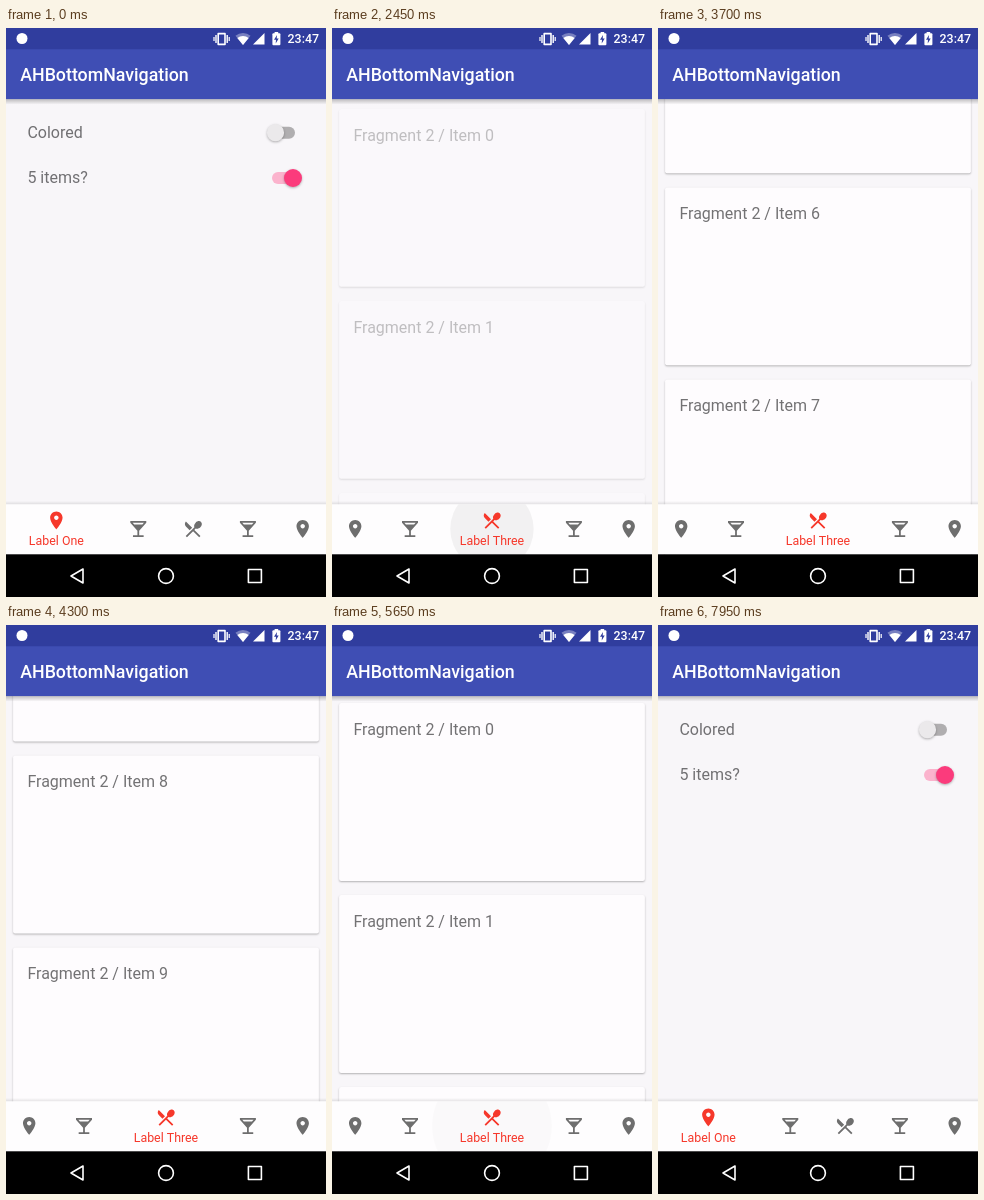
An HTML page with a canvas for the animation above (8000 ms loop, 320x569 px).

```html
<!DOCTYPE html>
<html lang="en">
<head>
<meta charset="utf-8">
<title>Bottom navigation</title>
<style>
html, body { margin: 0; height: 100%; overflow: hidden; background: #000; }
canvas { display: block; width: 100vw; height: 100vh; }
</style>
</head>
<body>
<canvas id="stage"></canvas>
<script>
const W = 320, H = 569, LOOP = 8000, DP = 320 / 360;
const dpr = window.devicePixelRatio || 1;
const screen2d = setup(document.getElementById('stage'));
const layer = setup(document.createElement('canvas'));   // holds a page while it fades
let c = screen2d;

const PIN = new Path2D('M12 2C8.13 2 5 5.13 5 9c0 5.25 7 13 7 13s7-7.75 7-13c0-3.87-3.13-7-7-7zm0 9.5c-1.38 0-2.5-1.12-2.5-2.5s1.12-2.5 2.5-2.5 2.5 1.12 2.5 2.5-1.12 2.5-2.5 2.5z');
const GLASS = new Path2D('M21 5V3H3v2l8 9v5H6v2h12v-2h-5v-5l8-9zM7.43 7L5.66 5h12.69l-1.78 2H7.43z');
const FORK = new Path2D('M8.1 13.34l2.83-2.83L3.91 3.5c-1.56 1.56-1.56 4.09 0 5.66l4.19 4.18zm6.78-1.81c1.53.71 3.68.21 5.27-1.38 1.91-1.91 2.28-4.65.81-6.12-1.46-1.46-4.2-1.1-6.12.81-1.59 1.59-2.09 3.74-1.38 5.27L3.7 19.87l1.41 1.41L12 14.41l6.88 6.88 1.41-1.41L13.41 13l1.47-1.47z');
const TABS = [[PIN, 'Label One'], [GLASS, 'Label Two'], [FORK, 'Label Three'], [GLASS, 'Label Four'], [PIN, 'Label Five']];
const TAPS = [[-9999, 0], [1035, 1], [2235, 2], [5223, 2], [6485, 0]];   // time, tab
const TOP = 71.1, BAR = 476.4, SYSTEM = 526.3;

const clamp = x => Math.max(0, Math.min(1, x));
const mix = (a, b, p) => a + (b - a) * p;
const smooth = p => (1 - Math.cos(Math.PI * clamp(p))) / 2;
const fling = (t, start, time) => 1 - (1 - clamp((t - start) / time) ** 1.15) ** 3;

function setup(canvas) {
  canvas.width = W * dpr;
  canvas.height = H * dpr;
  const ctx = canvas.getContext('2d');
  ctx.scale(dpr, dpr);
  return ctx;
}

function rect(x, y, w, h, color) {
  c.fillStyle = color;
  c.fillRect(x, y, w, h);
}

function round(x, y, w, h, r, color) {
  c.fillStyle = color;
  c.beginPath();
  c.roundRect(x, y, w, h, r);
  c.fill();
}

function disc(x, y, r, color) {
  c.fillStyle = color;
  c.beginPath();
  c.arc(x, y, r, 0, 7);
  c.fill();
}

function poly(color, ...p) {
  c.fillStyle = color;
  c.beginPath();
  for (let i = 0; i < p.length; i += 2) c.lineTo(p[i], p[i + 1]);
  c.closePath();
  c.fill();
}

function text(s, x, y, size, color, align = 'left', weight = 400) {
  c.font = `${weight} ${size}px Roboto, sans-serif`;
  c.textAlign = align;
  c.fillStyle = color;
  c.fillText(s, x, y);
}

function shade(y, h, from, to) {
  const g = c.createLinearGradient(0, y, 0, y + h);
  g.addColorStop(0, `rgba(0,0,0,${from})`);
  g.addColorStop(1, `rgba(0,0,0,${to})`);
  rect(0, y, W, h, g);
}

function shadow(blur, dy, alpha) {
  c.shadowColor = `rgba(0,0,0,${alpha})`;
  c.shadowBlur = blur * dpr;
  c.shadowOffsetY = dy * dpr;
}

function toggle(y, x, r, thumb, track) {
  round(266, y - 6, 23, 12, 6, track);
  c.save();
  shadow(2.5, 1, 0.3);
  disc(x, y, r, thumb);
  c.restore();
}

function home() {
  text('Colored', 21.4, 109.8, 16, '#717073');
  text('5 items?', 21.4, 155.3, 16, '#717073');
  toggle(104.7, 269.5, 8.6, '#ebe9eb', '#b0aeb0');
  toggle(150, 287, 9, '#fb3b7c', '#fbb3cd');
}

function list(index, scroll) {
  for (let i = Math.max(0, Math.floor(scroll / 192) - 1); ; i++) {
    const y = 78.1 + i * 192 - scroll;
    if (y > BAR) break;
    c.save();
    shadow(2, 1, 0.28);
    round(7.1, y, 305.8, 177.8, 2, '#fefcfe');
    c.restore();
    text(`Fragment ${index} / Item ${i}`, 21.4, y + 31.6, 16, '#737274');
  }
}

function scrollAt(t) {
  if (t < 5223) return 1110 * fling(t, 3100, 850) + 447 * fling(t, 3950, 700);
  const s = 1557 - 5.68 * (t - 5223);
  return s > 200 ? s : 200 * (1 - clamp((t - 5462) / 105)) ** 2;
}

function page(tab, alpha, dy, t) {
  if (alpha <= 0) return;
  c = layer;
  c.clearRect(0, 0, W, H);
  c.save();
  c.translate(0, dy);
  if (tab) list(tab, tab === 2 ? scrollAt(t) : 0);
  else home();
  c.restore();
  c = screen2d;
  c.globalAlpha = alpha;
  c.drawImage(layer.canvas, 0, 0, W, H);
  c.globalAlpha = 1;
}

function ripple(x, age) {
  disc(x, 501, 60, `rgba(0,0,0,${0.02 * (1 - clamp(age / 160))})`);
  const grow = clamp((age - 30) / 415);
  const fade = 1 - clamp((age - 30) / 570);
  disc(x, 501, 60 * (1 - (1 - grow) ** 2), `rgba(0,0,0,${0.085 * fade ** 1.5})`);
}

function bottomBar(cur, prev, age) {
  const e = cur === prev ? 1 : smooth((age - 50) / 150);
  shade(BAR - 3.5, 3.5, 0, 0.1);
  rect(0, BAR, W, SYSTEM - BAR, '#fefdfe');
  c.save();
  c.beginPath();
  c.rect(0, BAR, W, SYSTEM - BAR);
  c.clip();
  let x = -4.2;
  TABS.forEach(([icon, label], i) => {
    const on = (i === cur ? e : 0) + (i === prev && cur !== prev ? 1 - e : 0);
    const w = 54.8 + 54.3 * on, mid = x + w / 2;
    x += w;
    if (i === cur) ripple(mid, age);
    const color = `rgb(${mix(110, 246, on)},${mix(110, 56, on)},${mix(110, 43, on)})`;
    c.save();
    c.translate(mid, mix(501, 492.5, on));
    c.scale(DP, DP);
    c.translate(-12, -12);
    c.fillStyle = color;
    c.fill(icon, 'evenodd');
    c.restore();
    if (on > 0) {
      c.globalAlpha = on;
      c.font = '12.4px Roboto, sans-serif';
      const fits = c.measureText(label).width < w;
      text(fits ? label : 'Label', mid, 516.6, 12.4, color, 'center');
      c.globalAlpha = 1;
    }
  });
  c.restore();
}

function statusBar() {
  const white = '#fff';
  rect(0, 0, W, 21.3, '#303d9e');
  disc(16, 10.5, 5.5, white);
  // vibrate
  c.strokeStyle = white;
  c.lineWidth = 1.6;
  c.strokeRect(212.2, 5.6, 6.8, 10.8);
  for (const s of [-1, 1]) {
    rect(215.6 + s * 5.6 - 0.7, 7, 1.4, 8, white);
    rect(215.6 + s * 7.6 - 0.6, 9, 1.2, 4, white);
  }
  // wifi
  const fan = (r, color) => {
    c.fillStyle = color;
    c.beginPath();
    c.moveTo(237, 17);
    c.arc(237, 17, r, -Math.PI / 2 - 0.68, -Math.PI / 2 + 0.68);
    c.fill();
  };
  fan(12, 'rgba(255,255,255,.35)');
  fan(9, white);
  poly(white, 247, 16.5, 258.5, 16.5, 258.5, 5);
  // battery
  rect(268.6, 4, 3.6, 2, white);
  round(266.4, 5.2, 8, 12, 1, white);
  poly('#303d9e', 271, 7, 268, 11.8, 270, 11.8, 269.7, 15.4, 272.7, 10.4, 270.7, 10.4);
  text('23:47', 313, 15.3, 12.4, white, 'right', 500);
}

function systemBar() {
  rect(0, SYSTEM, W, H - SYSTEM, '#000');
  c.strokeStyle = '#fff';
  c.lineWidth = 1.6;
  c.lineJoin = 'round';
  c.beginPath();
  c.moveTo(77, 541);
  c.lineTo(77, 555);
  c.lineTo(65, 548);
  c.closePath();
  c.stroke();
  c.beginPath();
  c.arc(160, 548, 7.4, 0, 7);
  c.stroke();
  c.strokeRect(242.4, 541.5, 13, 13);
}

function draw(t) {
  rect(0, 0, W, H, '#f8f6f9');

  const k = TAPS.findLastIndex(tap => tap[0] <= t);
  const [start, cur] = TAPS[k];
  const prev = k ? TAPS[k - 1][1] : cur;
  const age = t - start;
  if (cur === prev) page(cur, 1, 0, t);
  else {
    const shown = clamp((age - 90) / 300);
    page(prev, 1 - clamp((age - 50) / 150), 0, t);
    page(cur, shown, 5 * (1 - shown), t);
  }

  rect(0, 21, W, TOP - 21, '#3f4eb4');
  shade(TOP, 5.5, 0.24, 0);
  text('AHBottomNavigation', 14.2, 53.3, 17.78, '#fff', 'left', 500);
  statusBar();
  bottomBar(cur, prev, age);
  systemBar();
}

const begin = performance.now();
function tick() {
  draw((performance.now() - begin) % LOOP);
  requestAnimationFrame(tick);
}
tick();
</script>
</body>
</html>
```
